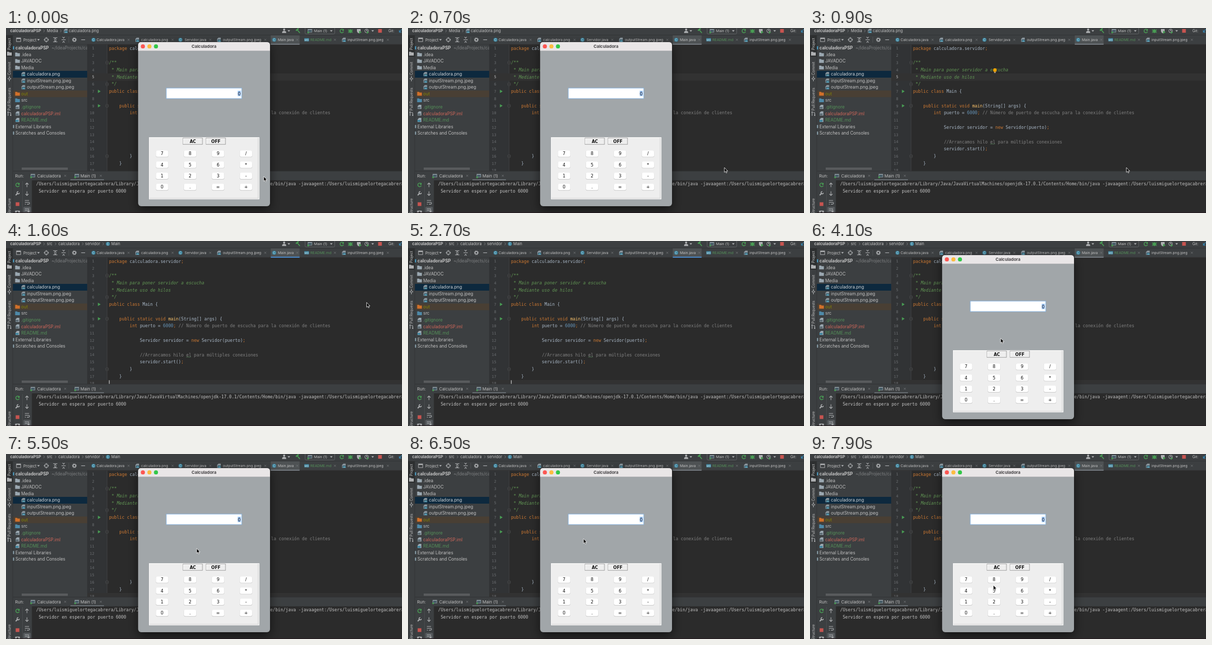
These frames come from a looping animation (756 by 354 pixels, 8000 ms). An HTML page:

```html
<!DOCTYPE html>
<html lang="es">
<head>
<meta charset="utf-8">
<title>Calculadora</title>
<style>
html, body { margin: 0; width: 100%; height: 100%; overflow: hidden; background: #2b2b2b; }
svg { display: block; width: 756px; height: 354px; }
text { white-space: pre; font-family: Inter, sans-serif; }
.mono { font-family: "DejaVu Sans Mono", monospace; }
.calc { font-family: "DejaVu Sans", sans-serif; }
.line { fill: none; stroke: #afb1b3; stroke-width: 1.1; }
</style>
</head>
<body>
<svg id="stage" viewBox="0 0 756 354"></svg>
<script>
const GREY = '#c2c2c2', ICON = '#afb1b3', PANEL = '#3c3f41', GREEN = '#499c54', RED = '#c75450', BLUE = '#3e86a0';
const PITCH = 13.77;

const rect = (x, y, w, h, fill, more = '') => `<rect x="${x}" y="${y}" width="${w}" height="${h}" fill="${fill}" ${more}/>`;
const dot = (x, y, r, fill, more = '') => `<circle cx="${x}" cy="${y}" r="${r}" fill="${fill}" ${more}/>`;
const text = (x, y, s, size = 8.3, fill = GREY, more = '') => `<text x="${x}" y="${y}" font-size="${size}" fill="${fill}" ${more}>${s}</text>`;
const shape = (d, fill, more = '') => `<path d="${d}" fill="${fill}" ${more}/>`;
const line = (d, color = ICON, width = 1.1) => `<path class="line" d="${d}" style="stroke:${color};stroke-width:${width}"/>`;
const group = (id, s) => `<g id="${id}">${s}</g>`;
const bold = 'font-weight="700"', middle = 'text-anchor="middle"';

const arrowDown = (x, y) => shape(`M${x - 2.5} ${y - 1.2}h5l-2.5 3z`, ICON);
const chevron = x => line(`M${x - 1} 3l2 2.5l-2 2.5`, '#8a8c8e', .8);
const cross = (x, y) => line(`M${x - 1.8} ${y - 1.8}l3.6 3.6m0-3.6l-3.6 3.6`, '#77797b', .8);
const folder = (x, y, fill) => shape(`M${x - 4.5} ${y - 3.6}h3.6l1.2 1.3h4.2v6h-9z`, fill);
const file = (x, y, fill) => shape(`M${x - 1} ${y - 4}h4.5v8h-7v-5.4z`, '#9aa7b0') + rect(x - 4, y, 6, 3.4, fill);
const javaClass = (x, y, r = 3.8) => dot(x, y, r, BLUE) + text(x, y + 2, 'C', 5.6, '#d5e3e8', middle);
const picture = (x, y) => shape(`M${x - 1} ${y - 4}h4.5v8h-7v-5.4z`, '#8b979f') + rect(x - 2.5, y - .5, 6.5, 4.5, '#3c5f6e') +
  shape(`M${x - 2} ${y + 3.4}l2-2.6l1.2 1.2l1-1l1.4 2.4z`, '#62b0c8');
const rerun = (x, y) => line(`M${x + 2.8} ${y - 2}a3.4 3.4 0 1 0 .6 3.4`, GREEN, 1.5) + shape(`M${x + 4} ${y - 4}v4h-4z`, GREEN);
const wrench = (x, y) => line(`M${x - 3.5} ${y + 3.5}l4-4`, ICON, 2) + line(`M${x + 1.5} ${y - 3.5}a2.2 2.2 0 1 0 2 2.4`, ICON, 1.5);
const app = (x, y) => rect(x - 4, y - 3.5, 8.5, 6.5, '#87939a') + rect(x - 3, y - 1.5, 6.5, 3.5, '#3f5661') + dot(x - 3, y + 3, 1.8, GREEN);

function topBar() {
  const file = chevron(72.5) + text(78, 8, 'Media', 7.4) + chevron(104.5) + picture(114, 5.5) + text(120, 8, 'calculadora.png', 7.5);
  const code = chevron(72.5) + text(78, 8, 'src', 7.4) + chevron(94.5) + text(100, 8, 'calculadora', 7.4) +
    chevron(146.5) + text(151, 8, 'servidor', 7.4) + chevron(185.5) + javaClass(194.5, 5.5) + text(201, 8, 'Main', 7.4);
  return rect(0, 0, 756, 13.5, PANEL) + rect(0, 13, 756, .8, '#303234') +
    text(8, 8, 'calculadoraPSP', 7.7, GREY, bold) + group('pathFile', file) + group('pathCode', code) +
    dot(531, 3, 2, ICON) + shape('M527 9.5q0-4 4-4t4 4z', ICON) + arrowDown(540, 5.5) +
    line('M556 3.5l5 6', GREEN, 1.8) + line('M553.5 5l5-4', GREEN, 2.4) +
    rect(571, -3, 56.5, 14.5, PANEL, 'rx="2" stroke="#5e6163"') + app(580, 5.5) + text(588, 8, 'Main (1)', 6.8) + arrowDown(621, 5.5) +
    rerun(641, 5.5) +
    `<ellipse cx="657.5" cy="6" rx="2.8" ry="3.6" fill="${GREEN}"/>` + line('M653 3l9 6m0-6l-9 6M653 6h9', GREEN) +
    shape('M670 2h7v4q-1 3-3.5 4q-3-1-3.5-4z', ICON) + shape('M674 5l5 3l-5 3z', GREEN) +
    dot(688.5, 5.5, 3.5, 'none', `stroke="${ICON}"`) + line('M688.5 3v2.5h2') + shape('M689 6l4 2.5l-4 2.5z', GREEN) + arrowDown(700, 5.5) +
    rect(710.5, 2, 7, 7, RED) + text(730, 8, 'Git:', 7.2) + line('M756 2l-5 6m0-4v4h4', '#3592c4');
}

function sideStripe() {
  const label = (y, s, fill = GREY) => text(0, 0, s, 6.9, fill, `transform="translate(8.8 ${y}) rotate(-90)"`);
  return rect(0, 13.5, 13, 341, PANEL) + rect(0, 14, 13, 41, '#2d2f30') + rect(12.5, 14, .8, 340, '#313335') +
    label(42, 'Project', '#d5d5d5') + folder(6.5, 49, ICON) +
    label(90, 'Commit') + line('M6.5 92v3m0 4v3M3 97h1.5m4 0h1.5') + dot(6.5, 97, 1.9, 'none', `stroke="${ICON}"`) +
    label(158, 'Pull Requests') + line('M4 161v7m5-1v-4q0-1.5-3-1.5') + dot(4, 161, 1.2, ICON) + dot(9, 167, 1.2, ICON) +
    label(356, 'Structure');
}

function projectPanel() {
  const rows = [
    [18, 'calculadoraPSP', GREY], [29, '.idea', GREY, '#9aa7b0'], [29, 'JAVADOC', GREY, '#9aa7b0'], [29, 'Media', GREY, '#9aa7b0'],
    [40, 'calculadora.png', '#d0d4d7', 'pic'], [40, 'inputStream.png.jpeg', GREY, 'pic'], [40, 'outputStream.png.jpeg', GREY, 'pic'],
    [29, 'out', '#848504', '#d0702a'], [29, 'src', GREY, '#4e89a8'], [29, '.gitignore', '#549159', 'doc'],
    [29, 'calculadoraPSP.iml', '#d1675a', 'doc'], [29, 'README.md', '#549159', 'doc'],
    [18, 'External Libraries', GREY], [18, 'Scratches and Consoles', GREY]];
  let s = rect(13, 13.5, 143, 261, PANEL) + rect(13, 30.8, 143, .8, '#323436') +
    rect(13, 82, 143, 13, '#0d293e') + rect(13, 119.6, 143, 12.7, '#493f34');
  rows.forEach(([x, name, fill, icon], i) => {
    const y = 38 + 12.55 * i, ix = x - 7;
    if (icon === 'pic') s += picture(ix, y);
    else if (icon === 'doc') s += file(ix, y, name.endsWith('md') ? BLUE : '#5c6b73');
    else if (icon) s += folder(ix, y, icon);
    else s += rect(13, y - 3, 2.5, 6, i ? '#8aa0aa' : '#4e9fc4');
    s += text(x, y + 3, name, 8.3, fill, i ? '' : bold);
  });
  return s + text(87, 41, '~/IdeaProjects/calculadoraPSP', 8.3, '#7d7f80') +
    rect(20, 19, 8, 7, 'none', `stroke="${ICON}"`) + rect(20, 19, 8, 2, ICON) + text(33, 25.5, 'Project', 7.6) + arrowDown(62, 22.5) +
    dot(77, 22.5, 3.6, 'none', `stroke="${ICON}"`) + line('M77 17.5v3.5m0 3v3.5M72 22.5h3.5m3 0h3.5') +
    line('M90 18.5h8M90 26.5h8M92 22l2-2l2 2m-4 1.5l2 2l2-2') + line('M106 22.5h8M108 17l2 2.5l2-2.5m-4 11l2-2.5l2 2.5') +
    rect(119.5, 17, .8, 11, '#55585a') + dot(130.5, 22.5, 2.5, 'none', `stroke="${ICON}" stroke-width="1.6"`) +
    dot(130.5, 22.5, 3.8, 'none', `stroke="${ICON}" stroke-width="1.2" stroke-dasharray="1.5 1.48"`) + line('M143.5 22.5h7.5') +
    rect(30, 267, 88, 4.5, '#595b5d');
}

function tabs() {
  const list = [[167, 173, 'Calculadora.java', 234], [250.5, 258, 'calculadora.png', 318], [333, 341, 'Servidor.java', 390],
    [406.5, 414, 'outputStream.png.jpeg', 495], [512, 519, 'Main.java', 556], [574.5, 581, 'README.md', 628], [645, 652, 'inputStream.png.jpeg', 729]];
  return rect(156, 13.5, 600, 18, PANEL) + rect(156, 30.8, 600, .8, '#323232') + rect(505.5, 14, 55, 17, '#4e5254') +
    rect(505.5, 30, 55, 2, '#747a80', 'id="tabMark"') + list.map(([ix, x, name, close]) => {
      const icon = name.endsWith('java') ? javaClass(ix, 22.5) : name.endsWith('md')
        ? rect(ix - 5, 19.5, 9, 6, BLUE) + text(ix - .5, 24.6, 'MD', 5, '#cfe2ea', middle) : picture(ix, 22.5);
      return icon + text(x, 25, name, 6.75, name.endsWith('md') ? '#549159' : GREY) + cross(close, 22.5);
    }).join('');
}

function paint(code) {
  if (/^ ?[/*]/.test(code)) return `<tspan fill="#629755" font-style="italic">${code}</tspan>`;
  return code.replace(/\/\/.*|\b(package|public|class|static|void|int|new)\b|;|\b6000\b|\bmain\b/g, m => {
    const fill = m.startsWith('//') ? '#808080' : m === '6000' ? '#6897bb' : m === 'main' ? '#ffc66d' : '#cc7832';
    return `<tspan fill="${fill}">${m}</tspan>`;
  });
}

function editor() {
  const code = `package calculadora.servidor;

/**
 * Main para poner servidor a escucha
 * Mediante uso de hilos
 */
public class Main {

    public static void main(String[] args) {
        int puerto = 6000; // Número de puerto de escucha para la conexión de clientes

            Servidor servidor = new Servidor(puerto);

            //Arrancamos hilo el para múltiples conexiones
            servidor.start();
        }
    }
`.split('\n');
  const rowY = n => 38.7 + PITCH * (n - 1);
  const number = (n, fill) => text(168.5, rowY(n) + 2.7, n, 7.2, fill, 'class="mono" text-anchor="end"');
  let s = rect(155, 31.5, 601, 243, '#2b2b2b') + rect(155, 31.5, 38, 243, '#313335') + rect(192.6, 31.5, .8, 243, '#454749') +
    group('row5', rect(155, 87, 601, 13.8, '#323232')) + group('row18', rect(155, 266, 601, 9, '#323232'));
  code.forEach((c, i) => {
    s += number(i + 1, '#6c6f72') + text(196.7, rowY(i + 1) + 2.8, paint(c), 8.16, '#a9b7c6', 'class="mono"');
  });
  for (const n of [3, 6, 9, 16]) {
    s += rect(190.5, rowY(n) - 2.5, 5, 5, '#2b2b2b', 'rx="1" stroke="#55585a" stroke-width=".7"') + line(`M191.7 ${rowY(n)}h2.6`, '#606366', .8);
  }
  for (const n of [7, 9]) s += shape(`M175.5 ${rowY(n) - 3.2}l5.2 3.2l-5.2 3.2z`, GREEN);
  return s + line('M344 222.5l1.5-1l1.5 1l1.5-1l1.5 1l1.5-1l1.5 1', '#659c6b', .7) +
    group('bulb', number(5, '#a4a3a3') + dot(353, 80.5, 3.4, '#eda200') + rect(351.5, 84, 3, 2.2, '#b5a080')) +
    group('caret', rect(196.6, 266.5, 1.2, 8, '#cfcfcf'));
}

function runPanel() {
  const home = '/Users/luismiguelortegacabrera';
  return rect(13, 273.8, 743, 81, PANEL) + rect(13, 273.5, 743, .8, '#2e3032') +
    rect(123, 289.6, 64, 2, '#747a80') +
    text(17.5, 285.8, 'Run:', 7.8) + app(51, 282.7) + text(59.5, 285.8, 'Calculadora', 8) + cross(113, 282.7) +
    app(135, 282.7) + text(142, 285.8, 'Main (1)', 8.1) + cross(181, 282.7) +
    rect(49.5, 291.4, 707, 64, '#2b2b2b') + rect(31, 293, .7, 61, '#515456') +
    rerun(22, 300) + line('M40 304.5v-8m-3 3l3-3l3 3') + wrench(22, 316.5) + line('M40 312.5v8m-3-3l3 3l3-3') +
    rect(18.5, 333.5, 7, 7, RED) + line('M36 330h8M36 333.5h7q2 0 2 1.8t-2 1.8h-3M36 337h2') +
    rect(33, 342, 14.5, 13, '#55595c', 'rx="2"') + line('M36 346h8M36 349h5M43 347v5m-2-2l2 2l2-2') +
    rect(17.5, 349.5, 9, 6, ICON, 'rx="1"') + dot(22, 352.5, 1.8, PANEL) +
    text(57.5, 301.2, `${home}/Library/Java/JavaVirtualMachines/openjdk-17.0.1/Contents/Home/bin/java -javaagent:${home}/`, 8.16, GREY, 'class="mono"') +
    text(62.4, 315.2, 'Servidor en espera por puerto 6000', 8.16, GREY, 'class="mono"') + rect(0, 352.8, 756, 1.2, '#271d21');
}

function calculator() {
  let s = rect(252.3, 27, 251.7, 314, '#a1a6a9', 'rx="6" filter="url(#shadow)"') +
    shape('M252.3 43.5v-10.5q0-6 6-6h239.7q6 0 6 6v10.5z', '#e9e6e7') + rect(252.3, 43, 251.7, .7, '#c2c2c3') +
    text(378, 38, 'Calculadora', 8.1, '#464446', `${bold} ${middle}`);
  ['#fc5753', '#fdbc40', '#33c748'].forEach((fill, i) => s += dot(261.3 + 12.5 * i, 35.2, 3.9, fill));
  s += rect(306, 115, 144, 20, '#fff', 'id="field"') + rect(442.3, 120, 6, 10.5, '#a5cdff', 'id="picked"') +
    text(448, 128.5, '0', 8.6, '#111', 'class="calc" text-anchor="end"') +
    rect(273, 209, 210.5, 118.5, '#eeeeee') + line('M273.5 327.5V209.5H483', '#fbfbfb') + line('M481.5 210V326H274', '#d0d0d0') +
    line('M483 209V327.3H273.5', '#f8f8f8');
  for (const [x, name] of [[338, 'AC'], [382, 'OFF']]) {
    s += rect(x, 210.5, 37, 12.2, '#eeeeee', 'stroke="#969696" stroke-width=".9"') + line(`M${x + 1} 222v-10.5h35`, '#fff') +
      text(x + 18.7, 219.7, name, 8, '#111', `class="calc" ${bold} ${middle}`);
  }
  [...'789/456*123-0.=+'].forEach((key, i) => {
    const x = 298 + 53.4 * (i % 4), y = 240.2 + 21.3 * (i >> 2);
    s += rect(x - 12, y - 5.6, 24, 12.7, '#cbcbcb', 'rx="3"') + rect(x - 11.7, y - 6, 23.4, 12.2, '#fff', 'rx="3"') +
      text(x, y + 3.1, key, 8.3, '#111', `class="calc" ${middle}`);
  });
  return s;
}

const $ = id => document.getElementById(id);
$('stage').innerHTML =
  '<filter id="shadow" x="-30%" y="-30%" width="160%" height="160%"><feDropShadow dx="0" dy="7" stdDeviation="10" flood-opacity=".55"/></filter>' +
  projectPanel() + editor() + tabs() + topBar() + runPanel() + sideStripe() + group('calc', calculator()) +
  group('pointer', shape('M0 0V9.2L2.1 7.3L3.5 10.4L5 9.7L3.7 6.7H6.4Z', '#000', 'stroke="#fff" stroke-width=".8" stroke-linejoin="round"'));

// Pointer stops: time, x, y
const trail = [[0, 492, 284], [700, 604, 267], [1100, 604, 267], [2000, 756, -2], [2001, 424, 265], [3100, 424, 265], [3900, 377, 184],
  [4000, 370, 192], [4100, 364, 186], [5300, 364, 186], [5600, 364, 178], [5900, 364, 178], [6500, 335, 162], [6800, 300, 105],
  [7700, 313, 222], [7900, 350, 251], [8000, 350, 251]];

const show = (id, on) => $(id).style.display = on ? '' : 'none';

function frame(now) {
  const t = Math.floor(now % 8000 / 100) * 100;
  const moved = t >= 1000, hidden = t >= 900 && t < 2800, focused = t !== 2800;
  const editing = moved && hidden;
  show('calc', !hidden);
  show('row5', !moved);
  show('bulb', !moved);
  show('row18', moved);
  show('caret', editing);
  show('pathFile', t < 1200);
  show('pathCode', t >= 1200);
  show('pointer', t < 2000 || t >= 3100);
  $('tabMark').setAttribute('fill', editing ? '#4a88c7' : '#747a80');
  $('field').setAttribute('stroke', focused ? '#86b4e2' : '#b9b9b9');
  $('picked').setAttribute('fill', focused ? '#a5cdff' : '#d2d2d2');

  const i = trail.findIndex(stop => stop[0] > t);
  const [t0, x0, y0] = trail[i - 1], [t1, x1, y1] = trail[i];
  const k = (t - t0) / (t1 - t0);
  $('pointer').setAttribute('transform', `translate(${x0 + (x1 - x0) * k} ${y0 + (y1 - y0) * k})`);
  requestAnimationFrame(frame);
}
requestAnimationFrame(frame);
</script>
</body>
</html>
```
